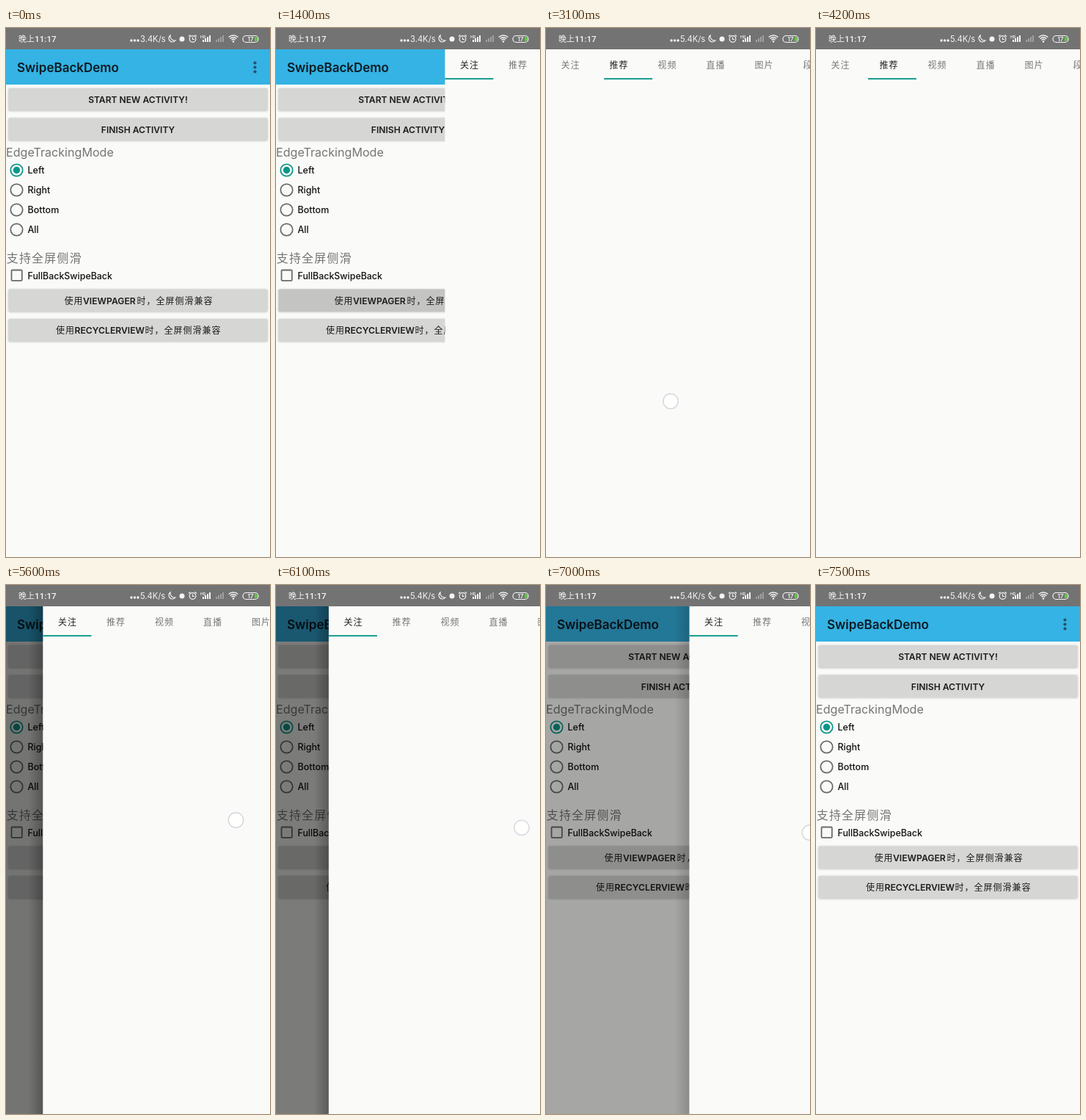
Recreate the animation shown at these times as an HTML page with a canvas. Size 360 by 720 pixels, loop 7.6 s.

```html
<!DOCTYPE html>
<html lang="zh-CN">
<head>
<meta charset="utf-8">
<style>
html, body { margin: 0; width: 100%; height: 100%; overflow: hidden; background: #fafbf8; }
canvas { display: block; }
</style>
</head>
<body>
<canvas id="stage" width="360" height="720"></canvas>
<script>
const ctx = document.getElementById('stage').getContext('2d');
const W = 360, H = 720, LOOP = 7600, STEP = 100, BAR = 29, TAB = 66;
const TEAL = '#0a9689', PAPER = '#fafbf8', INK = '#1c1c1c';
const FONT = 'Inter, "Noto Sans CJK SC", "Noto Sans CJK", sans-serif';

const clamp = v => Math.max(0, Math.min(1, v));
const progress = (t, start, length) => clamp((t - start) / length);
const easeInOut = u => u < 0.5 ? 4 * u ** 3 : 1 - 4 * (1 - u) ** 3;

function text(str, x, y, size, color = INK, weight = 400, align = 'left', font = FONT) {
  ctx.font = `${weight} ${size}px ${font}`;
  ctx.fillStyle = color;
  ctx.textAlign = align;
  ctx.textBaseline = 'alphabetic';
  ctx.fillText(str, x, y);
}

// Chinese text is set a little smaller and looser than Latin text
function hanText(str, x, y, size, ...style) {
  ctx.letterSpacing = `${size / 12}px`;
  text(str, x + size / 24, y, size, ...style);
  ctx.letterSpacing = '0px';
}

function rect(x, y, w, h, color) {
  ctx.fillStyle = color;
  ctx.fillRect(x, y, w, h);
}

function disc(x, y, r, color) {
  ctx.fillStyle = color;
  ctx.beginPath();
  ctx.arc(x, y, r, 0, 7);
  ctx.fill();
}

function arc(x, y, r, color, width, from = 0, to = Math.PI * 2) {
  ctx.strokeStyle = color;
  ctx.lineWidth = width;
  ctx.beginPath();
  ctx.arc(x, y, r, from, to);
  ctx.stroke();
}

function stroke(color, width, path) {
  ctx.strokeStyle = color;
  ctx.lineWidth = width;
  ctx.stroke(new Path2D(path));
}

// Touches: [time, x, y] points of each finger path
const touches = [
  [[1100, 180, 372], [1300, 180, 372]],
  [[2100, 243, 514], [2400, 100, 520]],
  [[2800, 333, 513], [3100, 170, 508]],
  [[3700, 160, 512], [3950, 306, 505]],
  [[4600, 170, 345], [4900, 336, 335]],
  [[5300, 263, 315], [5600, 313.5, 320], [6000, 346, 328], [6600, 279.5, 342],
   [6800, 300, 340], [6900, 350, 338], [7000, 359.5, 337]]
];

function touchAt(t) {
  const path = touches.find(p => t >= p[0][0] && t <= p[p.length - 1][0]);
  if (!path) return null;
  const i = Math.max(1, path.findIndex(p => p[0] >= t));
  const [a, b] = [path[i - 1], path[i]];
  const u = progress(t, a[0], b[0] - a[0]);
  return { x: a[1] + (b[1] - a[1]) * u, y: a[2] + (b[2] - a[2]) * u };
}

// Pager swipes: [start, direction]
const swipes = [[2100, 1], [2850, 1], [3700, -1], [4600, -1]];
const tabAt = t => swipes.reduce((pos, [start, dir]) => pos + dir * easeInOut(progress(t, start, 680)), 0);

function pageLeft(t) {
  if (t < 5300) return W * (1 - progress(t, 1300, 500)) ** 2;
  if (t <= 6900) return Math.max(0, touchAt(t).x - 263);
  return 87 + 293 * (1 - (1 - progress(t, 6900, 600)) ** 2.54);
}

function button(y, pressed) {
  ctx.save();
  ctx.shadowColor = 'rgba(0,0,0,.25)';
  ctx.shadowBlur = 3;
  ctx.shadowOffsetY = 0.5;
  ctx.fillStyle = pressed ? '#c4c5c2' : '#d6d7d4';
  ctx.beginPath();
  ctx.roundRect(3.5, y, 353, 30.5, 1.5);
  ctx.fill();
  ctx.restore();
}

function compatButton(y, name, x, nameEnd, pressed) {
  button(y, pressed);
  hanText('使用', x, y + 20, 12);
  text(name, x + 26, y + 20, 12.2, INK, 600);
  hanText('时，全屏侧滑兼容', nameEnd, y + 20, 12);
}

function drawHome(t) {
  rect(0, BAR, W, H, PAPER);
  rect(0, BAR, W, 48, '#34b3e4');
  text('SwipeBackDemo', 15, 60, 17, '#0b1a21', 600);
  for (const y of [47.5, 53.5, 59.5]) disc(339.5, y, 2.1, '#235166');

  button(82);
  text('START NEW ACTIVITY!', 180, 102, 12.1, INK, 600, 'center');
  button(122.5);
  text('FINISH ACTIVITY', 180, 142.7, 12.1, INK, 600, 'center');

  text('EdgeTrackingMode', 0, 175, 16.1, '#757575');
  ['Left', 'Right', 'Bottom', 'All'].forEach((label, i) => {
    const y = 193.5 + 27 * i;
    arc(14.5, y, 8.2, i ? '#6b6b6b' : TEAL, 1.8);
    if (!i) disc(14.5, y, 4.7, TEAL);
    text(label, 29.5, y + 4.8, 12.5, '#111', 500);
  });

  hanText('支持全屏侧滑', 0, 318.5, 15.9, '#757575');
  ctx.strokeStyle = '#6b6b6b';
  ctx.lineWidth = 1.8;
  ctx.beginPath();
  ctx.roundRect(7.5, 329.5, 14.3, 14.3, 1);
  ctx.stroke();
  text('FullBackSwipeBack', 29.5, 341.5, 12.4, '#111', 500);

  compatButton(355.5, 'VIEWPAGER', 79, 178, t >= 1100 && t < 1500);
  compatButton(396, 'RECYCLERVIEW', 67.5, 189, false);
}

function drawPager(t, left) {
  if (t > 5300 && left > 0) {
    rect(0, BAR, left, H, `rgba(0,0,0,${0.6 * (1 - left / 450)})`);
    const shade = ctx.createLinearGradient(left - 20, 0, left, 0);
    shade.addColorStop(0, 'rgba(0,0,0,0)');
    shade.addColorStop(1, `rgba(0,0,0,${0.32 * (1 - left / 400)})`);
    rect(left - 20, BAR, 20, H, shade);
  }
  const pos = tabAt(t), selected = Math.round(pos);
  ctx.save();
  ctx.translate(left, 0);
  rect(0, BAR, W, H, PAPER);
  ['关注', '推荐', '视频', '直播', '图片', '段子'].forEach((label, i) => {
    const on = i === selected;
    hanText(label, TAB * (i + 0.5), 54.7, 12, on ? '#222' : '#777', on ? 500 : 400, 'center');
  });
  rect(pos * TAB, 68.2, TAB, 1.9, TEAL);
  ctx.restore();
}

function signal(x, color) {
  for (let i = 0; i < 4; i++) rect(x + i * 3, 16 - i * 2, 2, 3 + i * 2, color);
}

function drawStatusBar(t) {
  const white = '#f4f4f4';
  rect(0, 0, W, BAR, '#737373');
  text('晚上', 17, 19.3, 11, white);
  text('11:17', 39, 19, 11.7, white, 500, 'left', 'Roboto, sans-serif');
  for (const x of [171, 175.5, 180]) disc(x, 17, 1.7, white);
  text(t < 2500 ? '3.4K/s' : '5.4K/s', 183, 19, 11.2, white);

  stroke(white, 1.2, 'M224 10 A5 5 0 1 0 231 17 A6 6 0 0 1 224 10Z');
  disc(240, 15, 3.5, white);
  arc(254.5, 15, 4.3, white, 1.2);
  stroke(white, 1.2, 'M254.5 12.5V15.5H257 M249 11.5L251.5 9.5 M260 11.5L257.5 9.5');
  text('HD', 265, 13.5, 5, white, 600);
  signal(268, white);
  signal(286, '#a0a0a0');
  for (const r of [3.5, 6.2, 9]) arc(310, 19, r, white, 1.4, -2.35, -0.79);
  disc(310, 18.5, 1.2, white);

  ctx.strokeStyle = white;
  ctx.lineWidth = 1.2;
  ctx.beginPath();
  ctx.roundRect(323, 10.5, 21, 9, 4.5);
  ctx.stroke();
  ctx.fillStyle = '#62c944';
  ctx.beginPath();
  ctx.roundRect(339, 12, 4, 6, [0, 3, 3, 0]);
  ctx.fill();
  text('17', 333.5, 18, 8, white, 600, 'center');
}

function drawTouch(t) {
  const p = touchAt(t);
  if (!p) return;
  disc(p.x, p.y, 10, 'rgba(255,255,255,.85)');
  arc(p.x, p.y, 10.2, '#d6d6de', 1.4);
}

function render(now) {
  const t = Math.floor(now % LOOP / STEP) * STEP;
  const left = pageLeft(t);
  drawHome(t);
  if (left < 375) drawPager(t, left);
  drawStatusBar(t);
  drawTouch(t);
}

const begin = performance.now();
function tick() {
  render(performance.now() - begin);
  requestAnimationFrame(tick);
}
tick();
</script>
</body>
</html>
```
